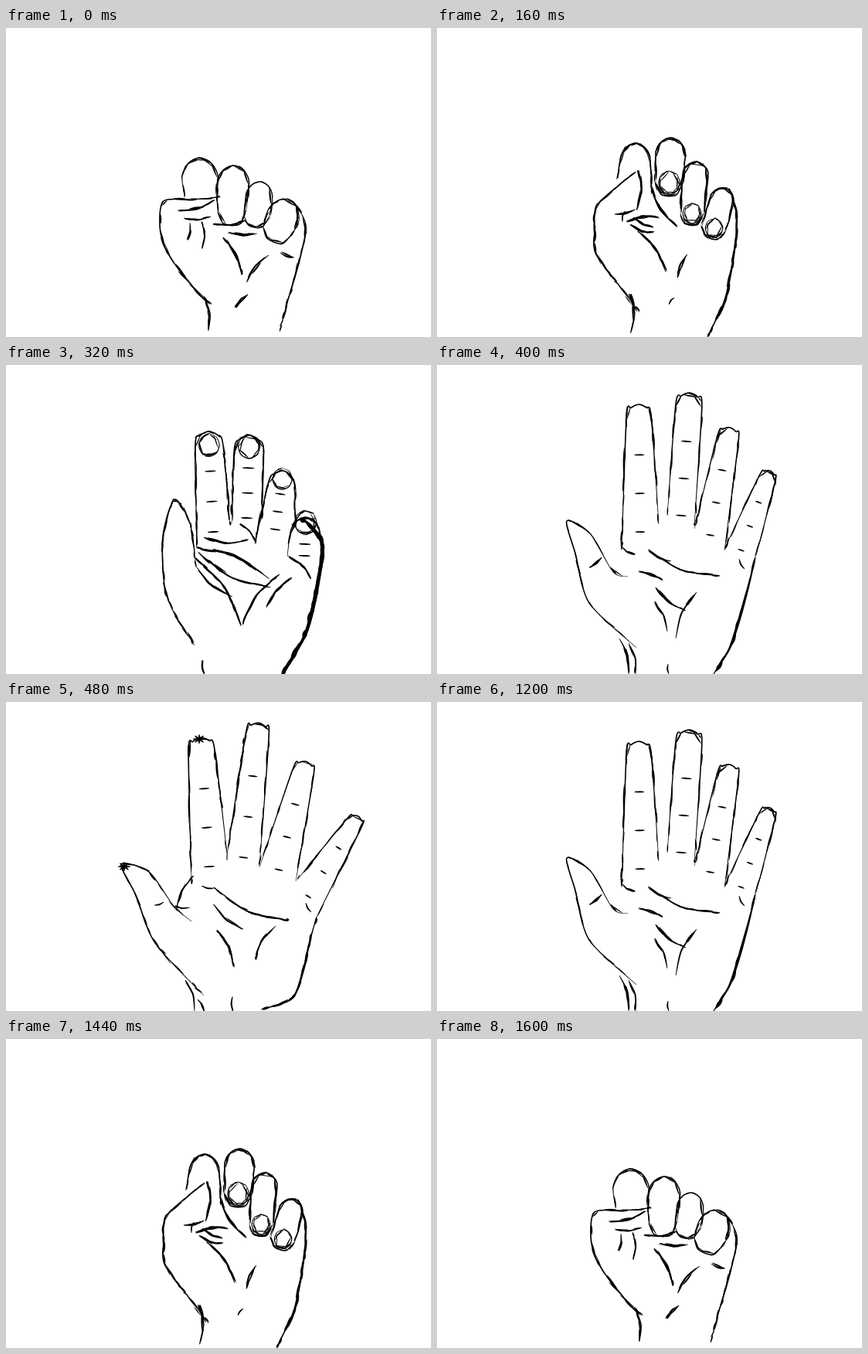
An HTML page with a canvas that plays this animation: 550x400 px, repeating every 2400 ms.

```html
<!DOCTYPE html>
<html lang="en">
<head>
<meta charset="utf-8">
<title>Opening hand</title>
<style>
html, body { margin: 0; width: 100%; height: 100%; overflow: hidden; background: #fff; }
canvas { display: block; }
</style>
</head>
<body>
<canvas id="stage" width="550" height="400"></canvas>
<script>
const ctx = document.getElementById('stage').getContext('2d');
const LOOP = 2400, STEP = 80, CLOSE_AT = 1200;

// Key poses. A finger is left base, right base, tip and width; thumb and side are
// curves; each fold is a slightly bent line between two points.
const fist = {
  open: 0, rough: 0.75, edge: 1.8, nailAt: 0, nailSize: 0,
  fingers: [
    [231,219, 273,222, 250,168, 46], [274,238, 311,235, 295,178, 41],
    [308,242, 341,243, 330,199, 34], [333,257, 374,261, 366,222, 42]],
  thumb: [278,219, 240,222, 204,224, 199,255, 206,285, 232,324, 266,358],
  side: [372,224, 388,255, 380,300, 365,352, 354,392],
  folds: [
    [222,236, 270,223], [230,246, 265,244], [234,274, 238,252], [254,286, 253,250],
    [305,320, 282,272], [340,294, 312,328], [313,345, 297,362], [355,291, 373,297],
    [288,264, 325,266], [268,253, 309,249], [262,392, 257,349]]
};

const curled = {
  open: 0, rough: 1, edge: 2.2, nailAt: 0, nailSize: 0.36,
  fingers: [
    [234,195, 278,215, 257,149, 38], [283,200, 318,200, 303,142, 38],
    [315,240, 345,240, 336,173, 33], [343,256, 374,262, 373,207, 31]],
  thumb: [257,187, 231,207, 206,231, 204,262, 205,291, 230,326, 262,368],
  side: [378,208, 388,240, 385,288, 373,350, 350,400],
  folds: [
    [258,236, 261,184], [230,241, 256,235], [243,237, 240,251], [288,246, 245,250],
    [296,316, 260,263], [324,293, 311,323], [307,349, 300,358], [255,246, 280,258],
    [250,255, 280,265], [276,203, 311,258], [251,394, 250,344]]
};

const halfOpen = {
  open: 1, rough: 0.8, edge: 5, nailAt: 0.87, nailSize: 0.37,
  fingers: [
    [247,235, 290,208, 262,86, 36], [292,205, 331,200, 315,91, 38],
    [322,232, 374,200, 359,137, 34], [364,248, 408,250, 388,197, 38]],
  thumb: [246,262, 238,205, 218,174, 203,222, 205,285, 217,320, 244,363],
  side: [382,198, 409,228, 403,285, 388,347, 358,400],
  folds: [
    [247,262, 293,300], [341,277, 247,237], [249,243, 343,288], [256,223, 313,227],
    [304,338, 245,250], [354,271, 306,336], [370,276, 337,314], [395,276, 366,248],
    [317,262, 268,239], [323,230, 303,205], [255,382, 257,400]]
};

const nearlyOpen = {
  open: 1, rough: 0.5, edge: 3.5, nailAt: 0, nailSize: 0,
  fingers: [
    [239,240, 287,206, 261,51, 32], [298,195, 333,208, 327,36, 34],
    [333,212, 372,240, 379,81, 28], [372,238, 412,250, 431,137, 22]],
  thumb: [247,274, 228,268, 198,218, 168,202, 179,244, 197,308, 258,366],
  side: [412,250, 402,290, 390,333, 378,368, 358,400],
  folds: [
    [273,239, 366,273], [239,235, 256,246], [197,262, 213,249], [274,240, 303,254],
    [298,345, 281,307], [336,294, 309,354], [299,387, 300,400], [391,251, 398,264],
    [292,279, 261,268], [283,288, 322,318], [248,400, 236,354], [257,400, 248,360]]
};

const open = {
  open: 1, rough: 0.5, edge: 2.6, nailAt: 0, nailSize: 0,
  fingers: [
    [240,235, 287,205, 252,46, 34], [285,205, 328,212, 327,27, 30],
    [328,214, 375,232, 388,77, 28], [377,230, 400,282, 456,148, 22]],
  thumb: [240,284, 217,264, 185,220, 149,210, 168,250, 193,312, 256,380],
  side: [402,278, 393,310, 384,350, 370,384, 332,398],
  folds: [
    [269,240, 366,283], [218,264, 238,266], [192,263, 204,259], [253,238, 270,241],
    [294,342, 273,295], [349,290, 322,333], [293,382, 294,400], [388,260, 395,272],
    [269,262, 307,294], [243,225, 220,270], [244,400, 232,360], [256,400, 248,385]],
  bursts: [[250,48], [153,213]]
};

const mix = (a, b, t) => a + (b - a) * t;

function between(a, b) {
  if (typeof a === 'number') return mix(a, b, 0.5);
  if (Array.isArray(a)) return a.map((value, i) => between(value, b[i]));
  return Object.fromEntries(Object.keys(a).map(key => [key, between(a[key], b[key])]));
}

const poses = [fist, between(fist, curled), curled, between(curled, halfOpen), halfOpen, nearlyOpen, open];

let seed = 1, rough = 1;
const random = (low = 0, high = 1) => {
  seed = seed * 16807 % 2147483647;
  return mix(low, high, seed / 2147483647);
};

const pairs = flat => flat.flatMap((x, i) => i % 2 ? [] : [[x, flat[i + 1]]]);

function spline(a, b, c, d, t) {
  const start = 0.4 * (c - a), end = 0.4 * (d - b);
  return b + t * (start + t * (3 * (c - b) - 2 * start - end + t * (2 * (b - c) + start + end)));
}

// Points about 2 px apart along a curve through the given ones.
function smooth(points) {
  const at = i => points[Math.max(0, Math.min(points.length - 1, i))], samples = [];
  for (let i = 0; i < points.length - 1; i++) {
    const [a, b, c, d] = [at(i - 1), at(i), at(i + 1), at(i + 2)];
    const steps = Math.ceil(Math.hypot(c[0] - b[0], c[1] - b[1]) / 2);
    for (let k = 0; k < steps; k++) {
      samples.push([0, 1].map(axis => spline(a[axis], b[axis], c[axis], d[axis], k / steps)));
    }
  }
  return [...samples, at(points.length - 1)];
}

// Fills a stroke that tapers towards both ends.
function brush(points, weight) {
  const left = [], right = [], last = points.length - 1;
  points.forEach(([x, y], i) => {
    const [x0, y0] = points[Math.max(0, i - 1)], [x1, y1] = points[Math.min(last, i + 1)];
    const length = Math.hypot(x1 - x0, y1 - y0) || 1;
    const half = weight / 2 * (0.3 + 0.7 * Math.sin(Math.PI * i / last));
    const nx = (y0 - y1) / length * half, ny = (x1 - x0) / length * half;
    left.push([x + nx, y + ny]);
    right.unshift([x - nx, y - ny]);
  });
  ctx.beginPath();
  for (const [x, y] of left.concat(right)) ctx.lineTo(x, y);
  ctx.fill();
}

// A curve gone over with short, straight, loose scratches.
function sketch(points, weight = 1.7) {
  const curve = smooth(points), last = curve.length - 1;
  brush(curve, weight);
  if (last < 10) return;
  for (let i = 0; i < last - 3; i += 4) {
    if (random() > rough) continue;
    const near = ([x, y]) => [x + random(-1.5, 1.5), y + random(-1.5, 1.5)];
    const from = near(curve[i]), to = near(curve[Math.min(last, i + Math.round(random(5, 11)))]);
    const scratch = Array.from({ length: 9 }, (_, k) => [0, 1].map(axis => mix(from[axis], to[axis], k / 8)));
    brush(scratch, weight * random(0.6, 1.4));
  }
}

function fold([x0, y0, x1, y1]) {
  const middle = [(x0 + x1) / 2 + (y0 - y1) * 0.1, (y0 + y1) / 2 + (x1 - x0) * 0.1];
  sketch([[x0, y0], middle, [x1, y1]], 2);
}

function oval(x, y, radius) {
  sketch(Array.from({ length: 9 }, (_, i) =>
    [x + radius * Math.sin(i * Math.PI / 4), y - 1.1 * radius * Math.cos(i * Math.PI / 4)]), 1.4);
}

function finger([lx, ly, rx, ry, tx, ty, width], pose, isIndex) {
  const bx = (lx + rx) / 2, by = (ly + ry) / 2, length = Math.hypot(tx - bx, ty - by);
  const ux = (tx - bx) / length, uy = (ty - by) / length;
  // Distance along the finger from its base, and sideways from its axis.
  const at = (along, across) => [bx + ux * along - uy * across, by + uy * along + ux * across];
  const shoulder = length - width * 0.5, top = length - width * 0.14;

  sketch([[lx, ly], at(shoulder, -width / 2), at(top, -width * 0.31), [tx, ty],
    at(top, width * 0.31), at(shoulder, width / 2), [rx, ry]]);
  if (pose.open < 0.5 && !isIndex) {
    sketch([[rx, ry], at(-width * 0.42, width * 0.25), at(-width * 0.42, -width * 0.25), [lx, ly]]);
  }
  if (pose.nailSize > 0.2 && !(isIndex && pose.nailAt < 0.5)) {
    oval(...at(length * pose.nailAt, 0), width * pose.nailSize);
  }
  if (pose.open > 0.5) {
    for (const part of [0.04, 0.33, 0.62]) {
      sketch([at(length * part, -width * 0.2), at(length * part, width * 0.2)], 2);
    }
  }
}

function burst([x, y]) {
  for (let angle = 0; angle < Math.PI; angle += Math.PI / 4) {
    const dx = 8 * Math.cos(angle), dy = 6 * Math.sin(angle);
    sketch([[x - dx, y - dy], [x + dx, y + dy]], 2.4);
  }
}

function drawHand(pose) {
  rough = pose.rough;
  pose.fingers.forEach((shape, i) => finger(shape, pose, i === 0));
  sketch(pairs(pose.thumb));
  sketch(pairs(pose.side), pose.edge);
  pose.folds.forEach(fold);
  (pose.bursts || []).forEach(burst);
}

function poseAt(time) {
  const step = Math.floor(time / STEP), top = poses.length - 1;
  return time < CLOSE_AT ? Math.min(top, step) : Math.max(0, top - 1 - step + CLOSE_AT / STEP);
}

let shown = -1;
function draw() {
  const index = poseAt(performance.now() % LOOP);
  if (index !== shown) {
    shown = index;
    seed = 97 + index;
    ctx.fillStyle = '#fff';
    ctx.fillRect(0, 0, 550, 400);
    ctx.fillStyle = '#000';
    drawHand(poses[index]);
  }
  requestAnimationFrame(draw);
}
draw();
</script>
</body>
</html>
```
